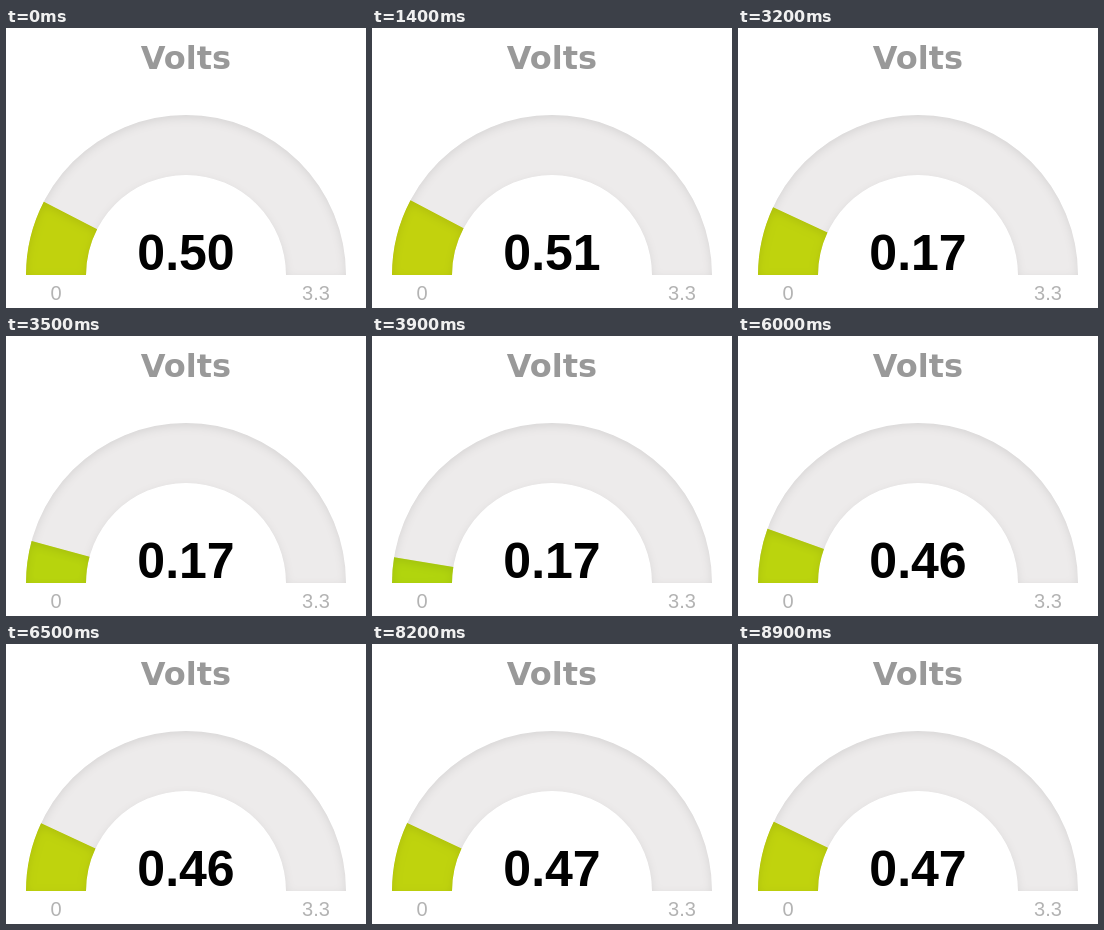
Animation, 360 px wide and 280 px high, one loop 9200 ms. Source, as an HTML page:

```html
<!DOCTYPE html>
<html lang="en">
<head>
<meta charset="utf-8">
<title>Volts gauge</title>
<style>
html, body { margin: 0; width: 100%; height: 100%; overflow: hidden; background: #fff; }
svg { display: block; }
text { text-anchor: middle; font-family: Arial, "Liberation Sans", sans-serif; }
.title { font: bold 32px "DejaVu Sans", sans-serif; fill: #999; }
.value { font-size: 50px; font-weight: bold; fill: #010101; }
.limit { font-size: 20px; fill: #b3b3b3; }
</style>
</head>
<body>
<svg width="360" height="280" viewBox="0 0 360 280">
  <filter id="inner">
    <feOffset dx="0" dy="3"/>
    <feGaussianBlur stdDeviation="5" result="blur"/>
    <feComposite operator="out" in="SourceGraphic" in2="blur" result="inverse"/>
    <feFlood flood-color="#000" flood-opacity=".2" result="tint"/>
    <feComposite operator="in" in="tint" in2="inverse" result="shadow"/>
    <feComposite operator="over" in="shadow" in2="SourceGraphic"/>
  </filter>
  <path id="track" fill="#edebeb" filter="url(#inner)"/>
  <path id="level" filter="url(#inner)"/>
  <text class="title" x="180" y="41">Volts</text>
  <text class="value" id="value" x="180" y="242"></text>
  <text class="limit" x="50" y="272">0</text>
  <text class="limit" x="310" y="272">3.3</text>
</svg>
<script>
const LOOP = 9200, STEP = 100, EASE_TIME = 700, MAX = 3.3;
const readings = [[-EASE_TIME, 0.5], [590, 0.51], [3187, 0.17], [5699, 0.46], [8190, 0.47]];
const track = document.getElementById('track');
const level = document.getElementById('level');
const label = document.getElementById('value');

const mix = (a, b, k) => a + (b - a) * k;

// Ring segment from the left end up to the given reading
function arc(v) {
  const a = Math.PI * (1 - v / MAX);
  const at = r => `${180 + r * Math.cos(a)} ${247 - r * Math.sin(a)}`;
  return `M80 247H20A160 160 0 0 1 ${at(160)}L${at(100)}A100 100 0 0 0 80 247Z`;
}

// Green towards yellow over the lower half of the scale
function color(v) {
  const k = v / MAX * 2;
  return `rgb(${mix(169, 249, k)},${mix(215, 200, k)},${mix(11, 2, k)})`;
}

function draw(now) {
  const t = Math.floor(now % LOOP / STEP) * STEP;
  const i = readings.findLastIndex(r => r[0] <= t);
  const [start, target] = readings[i];
  const from = i ? readings[i - 1][1] : target;
  const v = mix(from, target, Math.min(1, (t - start) / EASE_TIME) ** 0.48);
  level.setAttribute('d', arc(v));
  level.setAttribute('fill', color(v));
  label.textContent = target.toFixed(2);
}

track.setAttribute('d', arc(MAX));
const begin = performance.now();
function tick() {
  draw(performance.now() - begin);
  requestAnimationFrame(tick);
}
tick();
</script>
</body>
</html>
```
